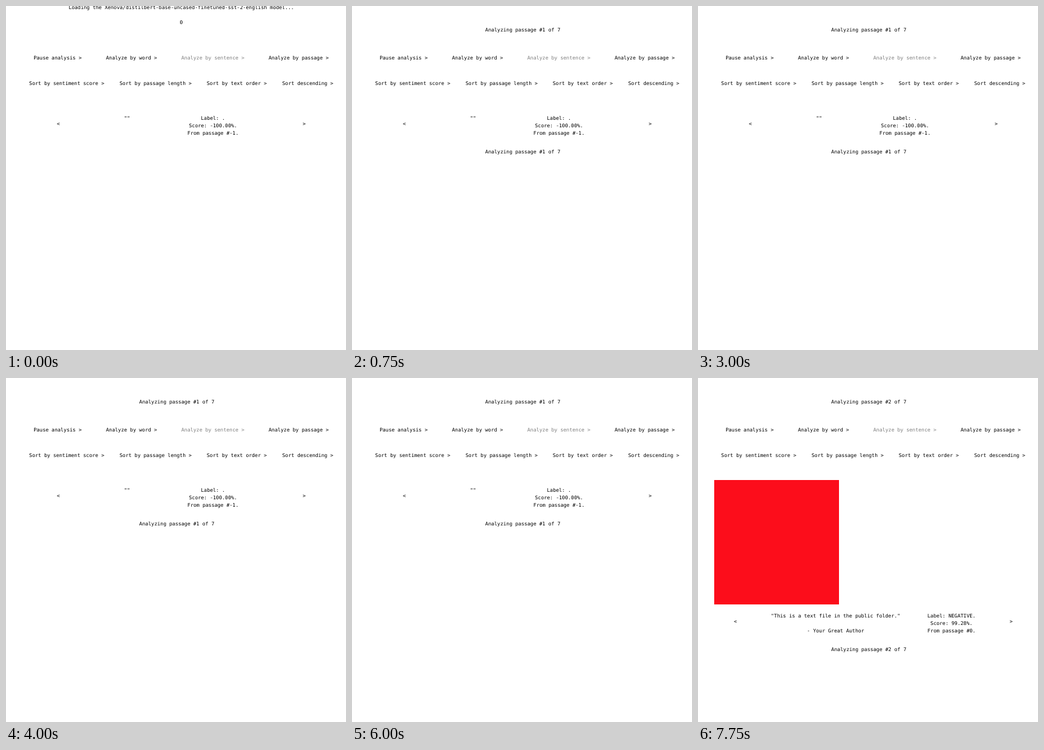
Animation, 545 px wide and 553 px high, one loop 8 s. Source, as an HTML page:

```html
<!DOCTYPE html>
<html lang="en">
<head>
<meta charset="utf-8">
<title>Passage analysis</title>
<style>
  html, body { margin: 0; width: 100%; height: 100%; overflow: hidden; background: #fff; }
  svg { display: block; }
  text { font: 8px "DejaVu Sans Mono", monospace; white-space: pre; text-rendering: geometricPrecision; }
  .mid { text-anchor: middle; }
  .off { opacity: .5; }
</style>
</head>
<body>
<svg width="545" height="553" viewBox="0 0 545 553">
  <g id="loading" class="mid">
    <text x="281" y="5.4">Loading the Xenova/distilbert-base-uncased-finetuned-sst-2-english model...</text>
    <text x="281" y="29.4">0</text>
  </g>

  <g id="controls">
    <text x="44.2" y="86">Pause analysis &gt;</text>
    <text x="160.3" y="86">Analyze by word &gt;</text>
    <text x="281" y="86" class="off">Analyze by sentence &gt;</text>
    <text x="421" y="86">Analyze by passage &gt;</text>
    <text x="37.1" y="127">Sort by sentiment score &gt;</text>
    <text x="182" y="127">Sort by passage length &gt;</text>
    <text x="321.8" y="127">Sort by text order &gt;</text>
    <text x="442.8" y="127">Sort descending &gt;</text>
  </g>

  <g id="empty" class="mid">
    <text x="84" y="192.3">&lt;</text>
    <text x="194" y="183.3">""</text>
    <text x="331.8" y="183.3">Label: .</text>
    <text x="331.8" y="195.3">Score: -100.00%.</text>
    <text x="331.8" y="207.3">From passage #-1.</text>
    <text x="478" y="192.3">&gt;</text>
  </g>

  <g id="result" class="mid">
    <rect x="26" y="164" width="200" height="200" fill="#fc0d1b"/>
    <text x="60" y="394.3">&lt;</text>
    <text x="220.6" y="385.3">"This is a text file in the public folder."</text>
    <text x="220.6" y="409.3">- Your Great Author</text>
    <text x="406.3" y="385.3">Label: NEGATIVE.</text>
    <text x="406.3" y="397.3">Score: 99.28%.</text>
    <text x="406.3" y="409.3">From passage #0.</text>
    <text x="502" y="394.3">&gt;</text>
  </g>

  <g id="status">
    <text x="213.6" y="41.3">Analyzing passage #<tspan class="count">1</tspan> of 7<tspan class="dots">...</tspan></text>
    <text id="footer" x="213.6" y="237.3">Analyzing passage #<tspan class="count">1</tspan> of 7<tspan class="dots">...</tspan></text>
  </g>
</svg>
<script>
  const LOOP = 8000, LOADED = 250, DOTS_START = 1000, DOTS_PERIOD = 1000, SCORED = 7750;
  const $ = id => document.getElementById(id);
  const show = (id, on) => $(id).style.display = on ? "" : "none";
  const counts = document.querySelectorAll(".count");
  const dots = document.querySelectorAll(".dots");

  function draw(now) {
    const t = Math.floor(now % LOOP);
    const scored = t >= SCORED;
    show("loading", t < LOADED);
    show("status", t >= LOADED);
    show("empty", !scored);
    show("result", scored);
    $("footer").setAttribute("y", scored ? 439.3 : 237.3);
    counts.forEach(c => c.textContent = scored ? 2 : 1);

    // The dots fade in once per period and restart with each passage.
    const phase = t < DOTS_START || scored ? 0 : (t - DOTS_START) % DOTS_PERIOD / DOTS_PERIOD;
    dots.forEach(d => d.style.fillOpacity = phase ** 2);
    requestAnimationFrame(draw);
  }
  draw(performance.now());
</script>
</body>
</html>
```
